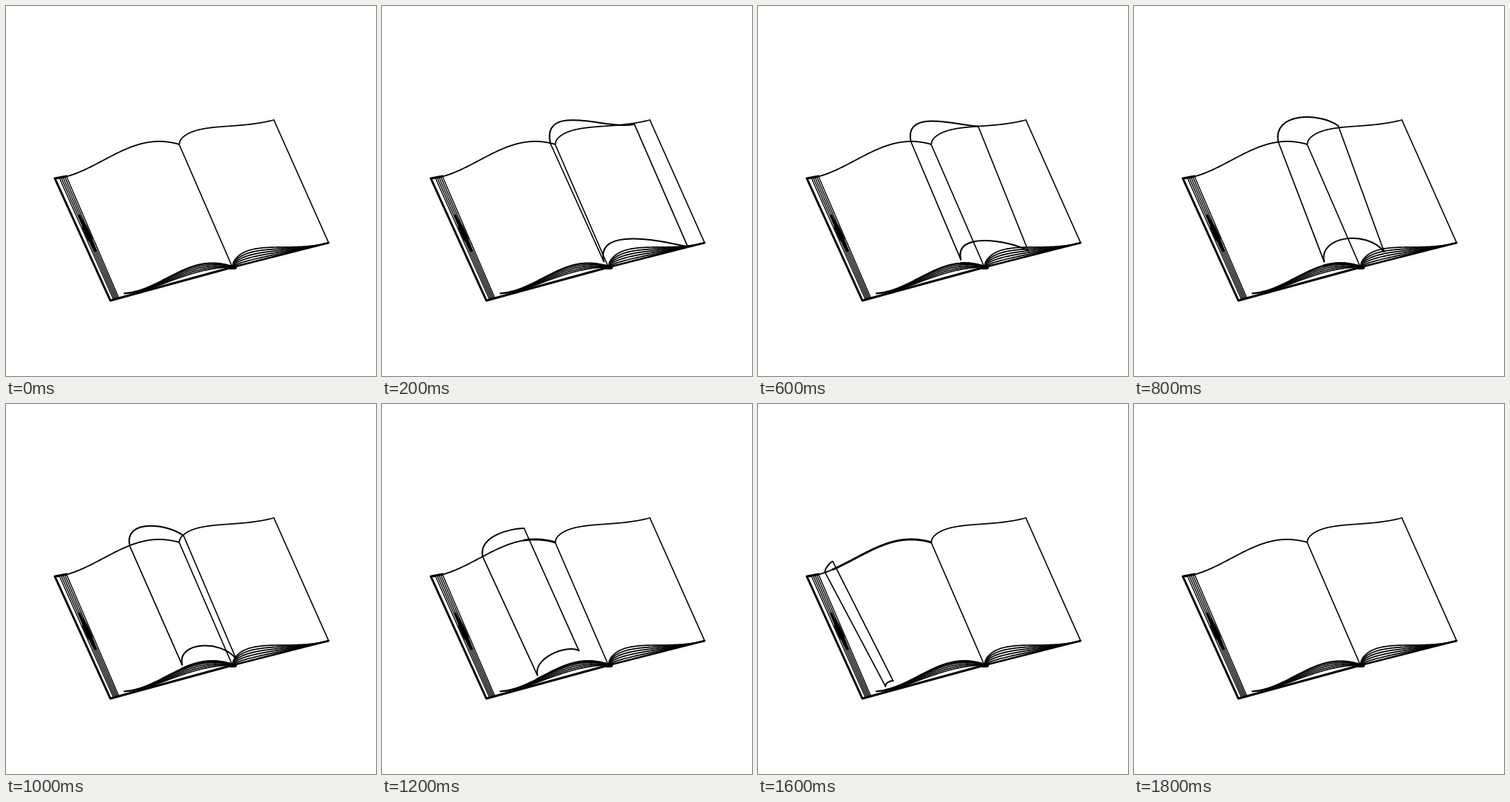
These frames come from a looping animation (500 px wide and 500 px high, 1.9 s). An HTML page with a canvas:

```html
<!DOCTYPE html>
<html>
<head>
<meta charset="utf-8">
<style>
html, body { margin: 0; height: 100%; overflow: hidden; background: #fff; }
canvas { display: block; }
</style>
</head>
<body>
<canvas id="stage" width="500" height="500"></canvas>
<script>
const ctx = document.getElementById('stage').getContext('2d');
const LOOP = 1900, STEP = 100, PAGE_LENGTH = 181;
const spine = { top: [234, 187], bottom: [306, 353] };
const corner = { left: [141, 398], rightTop: [362, 154], right: [436, 320] };

// Time, fold x, free edge x and y, sideways lean from top to bottom
const poses = [
  [100, 232, 352, 158, 72],
  [400, 218, 319, 163, 73],
  [800, 195, 276, 162, 62],
  [1000, 167, 240, 178, 71],
  [1200, 136, 192, 168, 74],
  [1400, 114, 139, 188, 81],
  [1700, 79, 82, 225, 82],
];

const mix = (a, b, k) => a + (b - a) * k;
const chord = (a, b) => x => mix(a[1], b[1], (x - a[0]) / (b[0] - a[0]));

// Page outlines as y(x)
const wave = (mid, height, from, span) => x => mid + height * Math.cos(Math.PI * (x - from) / span);
const leftTop = wave(208.5, 25.5, 56, 151);
const leftBottom = wave(368, 20.5, 155, 124);
const leftCover = chord(corner.left, spine.bottom);

function bulge(a, b, height) {
  const base = chord(a, b);
  return x => {
    const u = (x - a[0]) / (b[0] - a[0]);
    return base(x) - height * Math.sqrt(u) * (1 - u) ** 2;
  };
}

function line(width, ...points) {
  ctx.lineWidth = width;
  ctx.beginPath();
  for (const p of points) ctx.lineTo(...p);
  ctx.stroke();
}

function plot(width, fn, from, to) {
  const points = [];
  for (let x = from; x < to; x++) points.push([x, fn(x)]);
  line(width, ...points, [to, fn(to)]);
}

function drawBook() {
  plot(1.8, leftTop, 66, 234);
  plot(1.7, bulge(spine.top, corner.rightTop, 45), 234, 362);
  line(1.6, corner.rightTop, corner.right);
  line(1.6, spine.top, spine.bottom);
  line(3, [82, 230], [66, 233], corner.left, spine.bottom);
  line(2.6, spine.bottom, corner.right);

  // Fore edge, with its dark patch
  for (let k = 0; k < 5; k++) {
    line(1.4, [72 + 2.4 * k, 232 - k / 2], [145 + 1.8 * k, 396 - k / 2]);
  }
  for (const width of [3, 5, 7]) {
    const reach = 36 - 4 * width;
    line(width, [110 - reach * 0.45, 307 - reach], [110 + reach * 0.45, 307 + reach]);
  }

  // Sheets between page and cover
  for (let k = 0; k < 5; k++) {
    plot(k ? 1.6 : 2.2, x => mix(leftBottom(x), leftCover(x), k * 0.15), 160 + 8 * k, 306);
    plot(1.7, bulge(spine.bottom, corner.right, 60 - 12 * k), 306, 436);
  }
  line(6, [304, 353], [309, 353]);
}

// Edge of the leaf, arching from its fold to its free side
function curl(fold, free, height, tilt) {
  const w = free[0] - fold[0];
  ctx.lineWidth = 2;
  ctx.beginPath();
  ctx.moveTo(...fold);
  ctx.bezierCurveTo(fold[0] - 0.1 * w, fold[1] - height * w,
    free[0] - 0.3 * w, free[1] - tilt * w, ...free);
  ctx.stroke();
}

function drawLeaf(t) {
  const i = Math.min(poses.findLastIndex(p => p[0] <= t), poses.length - 2);
  const k = (t - poses[i][0]) / (poses[i + 1][0] - poses[i][0]);
  const [, foldX, freeX, freeY, lean] = poses[i].map((v, j) => mix(v, poses[i + 1][j], k));

  const fold = [foldX, leftTop(foldX)], free = [freeX, freeY];
  const foldEnd = [foldX + lean, leftBottom(foldX + lean) - 5];
  const freeEnd = [freeX + lean, freeY + Math.sqrt(PAGE_LENGTH ** 2 - lean ** 2)];
  const tilt = 0.36 * Math.exp(-(((t - 900) / 250) ** 2)) - 0.08;

  curl(fold, free, 0.5, tilt);
  curl(foldEnd, freeEnd, 0.42, tilt + 0.15);
  line(1.6, fold, foldEnd);
  line(1.6, free, freeEnd);

  // Part of the leaf already lying on the left page
  if (freeX < 234) plot(2.8, leftTop, freeX, 234);
  plot(2.8, leftBottom, foldEnd[0], 306);
}

function draw(now) {
  const t = Math.floor(now % LOOP / STEP) * STEP;
  ctx.clearRect(0, 0, 500, 500);
  ctx.lineCap = ctx.lineJoin = 'round';
  drawBook();
  if (t >= 100 && t <= 1700) drawLeaf(t);
}

const start = performance.now();
function tick() {
  draw(performance.now() - start);
  requestAnimationFrame(tick);
}
tick();
</script>
</body>
</html>
```
